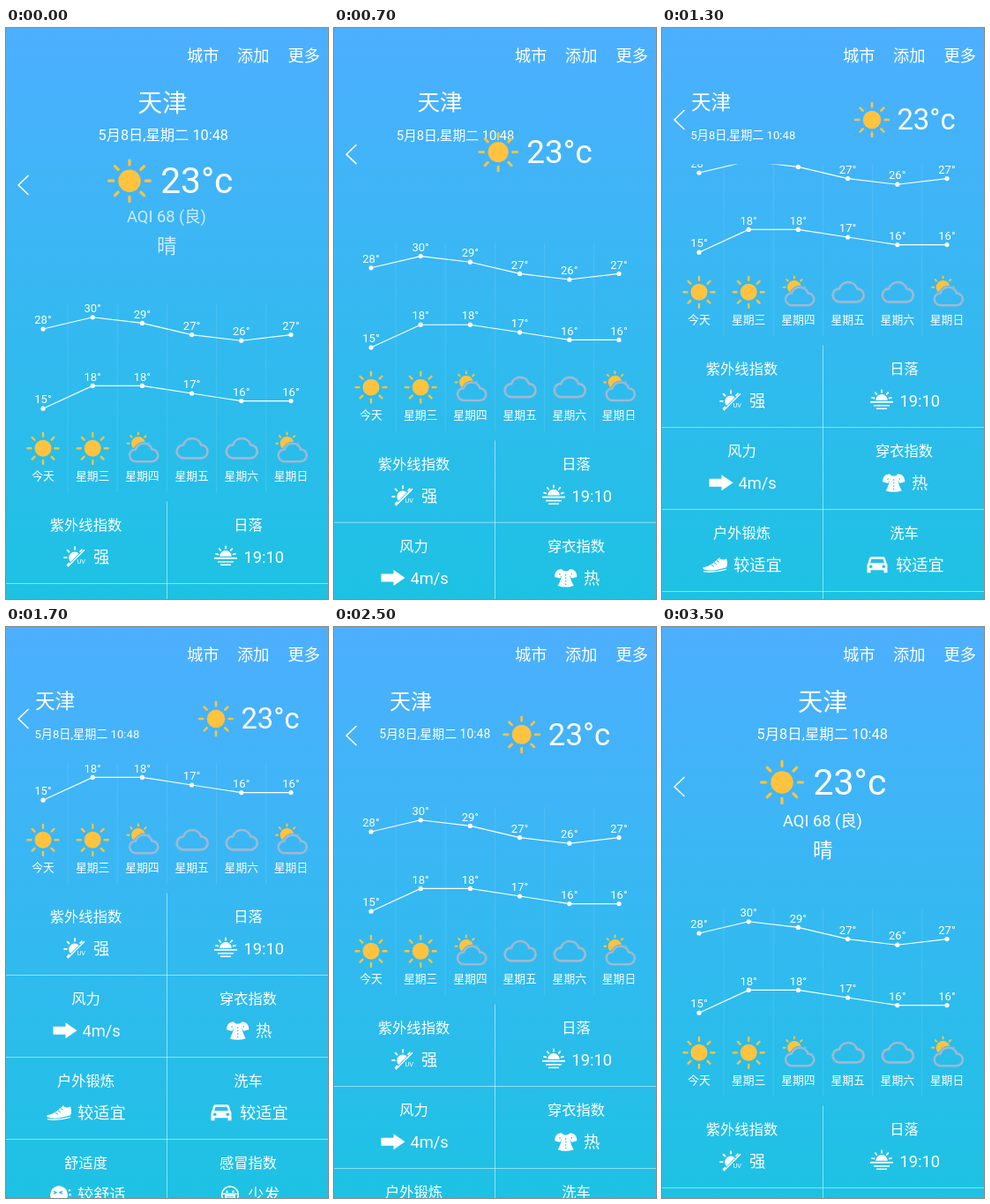
Animation, 365 px wide and 647 px high, one loop 3800 ms. Source, as an HTML page:

```html
<!DOCTYPE html>
<html lang="zh-CN">
<head>
<meta charset="utf-8">
<title>天气</title>
<style>
  html, body { margin: 0; width: 100%; height: 100%; overflow: hidden; background: #1dc2e3; }
  svg { display: block; width: 365px; height: 647px; }
  text { font-family: Roboto, "Noto Sans CJK SC", "Noto Sans CJK", sans-serif; fill: #fff; white-space: pre; }
</style>
</head>
<body>
<svg id="stage" viewBox="0 0 365 647" xmlns="http://www.w3.org/2000/svg"></svg>
<script>
const LOOP = 3800, STEP = 100, COLLAPSE = 153;
const SUN = '#ffc33f', CLOUD = '#a0b8d0', SKY = '#27bee8';

// time in ms, scroll offset in px
const SCROLL = [
  [0, 6], [300, 6], [400, 14], [500, 33], [600, 54], [700, 75.2], [1000, 132],
  [1300, 183], [1700, 241], [1800, 252], [1900, 261], [2000, 267], [2100, 267],
  [2200, 240], [2300, 200], [2400, 156], [2500, 115], [2600, 87], [2700, 64],
  [2800, 45], [2900, 29], [3000, 15.8], [3100, 6], [3200, 1], [3300, 1],
  [3400, 0.5], [3500, 0], [3800, 0]
];

const text = (str, x, y, size, anchor = 'start', extra = '') =>
  `<text x="${x}" y="${y + size * 0.38}" font-size="${size}" text-anchor="${anchor}" ${extra}>${str}</text>`;
const line = (x1, y1, x2, y2, opacity, width = 1) =>
  `<path d="M${x1} ${y1}L${x2} ${y2}" stroke="#fff" stroke-width="${width}" opacity="${opacity}"/>`;
const group = (x, y, body, extra = '') => `<g transform="translate(${x} ${y})" ${extra}>${body}</g>`;

function rays(cx, cy, inner, outer, angles, width, color) {
  const d = angles.map(a => {
    const c = Math.cos(a * Math.PI / 180), s = Math.sin(a * Math.PI / 180);
    return `M${cx + c * inner} ${cy + s * inner}L${cx + c * outer} ${cy + s * outer}`;
  }).join('');
  return `<path d="${d}" stroke="${color}" stroke-width="${width}" stroke-linecap="round" fill="none"/>`;
}

const ALL_AROUND = [0, 45, 90, 135, 180, 225, 270, 315];
const sun = `<circle r="12.8" fill="${SUN}"/>` + rays(0, 0, 18.3, 23.6, ALL_AROUND, 3.2, SUN);

const CLOUD_PATH = 'M-10 11A7.5 7.5 0 0 1 -10 -4A10.5 10.5 0 0 1 10 -4A7.5 7.5 0 0 1 10 11Z';
const cloud = `<path d="${CLOUD_PATH}" fill="none" stroke="${CLOUD}" stroke-width="2.7"/>`;
const partly =
  `<g mask="url(#behindCloud)"><circle cx="-4.5" cy="-5.5" r="7.8" fill="${SUN}"/>` +
  rays(-4.5, -5.5, 10.3, 12.3, ALL_AROUND, 2, SUN) + '</g>' +
  `<g transform="translate(1.8 4.8) scale(.92)">${cloud}</g>`;

const icons = {
  uv: '<path d="M-4.8 5.6A6.6 6.6 0 0 1 4.6 -3.8Z"/>' +
    rays(0, 0.8, 9.3, 11.8, [135, 180, 225, 270, 312], 2, '#fff') +
    line(-8, 11, 11, -8, 1, 1.5) + text('UV', 2.5, 5, 7.5),
  sunset: '<path d="M-6.8 -.5A6.8 6.8 0 0 1 6.8 -.5Z"/>' +
    rays(0, -0.5, 9, 11.3, [195, 230, 270, 310, 345], 1.8, '#fff') +
    line(-13, 1.5, 13, 1.5, 1, 1.8) + line(-9, 5.5, 9, 5.5, 1, 1.6) + line(-6, 9, 6, 9, 1, 1.5),
  arrow: '<path d="M-13 -4.5H1V-9L14 0L1 9V4.5H-13Z"/>',
  dress: '<path d="M-5 -10Q0 -5 5 -10L9 -9Q13 -6 12.5 -1L7 0.5L5 -1Q6 4 9 9Q0 12 -9 9Q-6 4 -5 -1L-7 .5L-12.5 -1Q-13 -6 -9 -9Z"/>' +
    `<path d="M0 -4V9M-7 -5L-5 -1M7 -5L5 -1" stroke="${SKY}" stroke-width="1.2" stroke-dasharray="1.5 2"/>`,
  shoe: '<path d="M-13.5 3Q-7 2 -2 -2L5 -8Q8 -4 13 -7Q15 -1 13 3Q5 5 1 6Q-8 7 -13.5 5Z"/>' +
    '<path d="M-13 7.5Q0 9 13 5" fill="none" stroke="#fff" stroke-width="1.4"/>' +
    `<path d="M-4 0L-1 2M-1 -2.5L2 -.5M2 -5L5 -3" stroke="${SKY}" stroke-width="1"/>`,
  car: '<path d="M-7 -9H7Q8.5 -9 9 -7L10.5 -2Q11.5 -1 11.5 1V9H7.5V6H-7.5V9H-11.5V1Q-11.5 -1 -10.5 -2L-9 -7Q-8.5 -9 -7 -9Z"/>' +
    `<path d="M-6.5 -6.5H6.5L8 -2H-8Z" fill="${SKY}"/><circle cx="-7.3" cy="2" r="1.8" fill="${SKY}"/><circle cx="7.3" cy="2" r="1.8" fill="${SKY}"/>`,
  face: '<circle cx="-2" r="10"/>' +
    `<path d="M-8 -4L-5 -2.5L-8 -1M2 -4L-1 -2.5L2 -1M-6 4Q-2 8 2 4" fill="none" stroke="${SKY}" stroke-width="1.4"/>` +
    '<circle cx="10" cy="-5" r="1.3"/><circle cx="10.5" cy="0" r="1.3"/><circle cx="9.5" cy="5" r="1.3"/>',
  mask: '<circle r="9.3" fill="none" stroke="#fff" stroke-width="1.7"/><path d="M-6 0H6V4Q0 9 -6 4Z"/>' +
    '<circle cx="-3.5" cy="-3.5" r="1.3"/><circle cx="3.5" cy="-3.5" r="1.3"/>' + line(-9, -1, 9, -1, 1, 1.3) +
    `<path d="M-4 2.5H4M-3 4.8H3" stroke="${SKY}" stroke-width=".9"/>`
};

// day, high, low, icon
const DAYS = [
  ['今天', 28, 15, 'sun'], ['星期三', 30, 18, 'sun'], ['星期四', 29, 18, 'partly'],
  ['星期五', 27, 17, 'cloud'], ['星期六', 26, 16, 'cloud'], ['星期日', 27, 16, 'partly']
];
const SKIES = {
  sun: `<g transform="scale(.74)">${sun}</g>`,
  cloud: `<g transform="translate(.5 0)">${cloud}</g>`,
  partly
};

// title, icon, icon x, value, value x
const CELLS = [
  ['紫外线指数', 'uv', 78, '强', 99], ['日落', 'sunset', 249, '19:10', 269.5],
  ['风力', 'arrow', 66.5, '4m/s', 86.5], ['穿衣指数', 'dress', 262.7, '热', 283],
  ['户外锻炼', 'shoe', 60, '较适宜', 81], ['洗车', 'car', 244, '较适宜', 265],
  ['舒适度', 'face', 62, '较舒适', 81], ['感冒指数', 'mask', 254, '少发', 274]
];

const dayX = i => 42 + i * 56.2;

function series(column, yOf) {
  const points = DAYS.map((day, i) => [dayX(i), yOf(day[column])]);
  return `<polyline points="${points.join(' ')}" fill="none" stroke="#fff" stroke-width="1.1"/>` +
    points.map(([x, y], i) => `<circle cx="${x}" cy="${y}" r="2.6" fill="#fff"/>` +
      text(DAYS[i][column] + '°', x, y - 10.8, 13, 'middle')).join('');
}

function forecast() {
  const dividers = [1, 2, 3, 4, 5].map(i => line(dayX(i) - 28.2, 319, dayX(i) - 28.2, 532, 0.1)).join('');
  const days = DAYS.map(([name, , , sky], i) =>
    group(dayX(i), 482.3, SKIES[sky]) + text(name, dayX(i), 513.5, 12.8, 'middle')).join('');
  return dividers + series(1, t => 347 - (t - 28) * 6.6) + series(2, t => 437.2 - (t - 15) * 8.6) + days;
}

function indices() {
  const rules = [0, 1, 2].map(i => line(0, 635.5 + 93 * i, 365, 635.5 + 93 * i, 0.5)).join('');
  return rules + line(182.5, 542.5, 182.5, 914.5, 0.5) + CELLS.map(([title, icon, ix, value, vx], i) => {
    const y = 93 * (i >> 1);
    return text(title, i % 2 ? 274.5 : 90.5, 569 + y, 16.3, 'middle') +
      group(ix, 605.3 + y, icons[icon], 'fill="#fff"') + text(value, vx, 605.5 + y, 18.3);
  }).join('');
}

const stage = document.getElementById('stage');
stage.innerHTML = `
  <defs>
    <linearGradient id="sky" x2="0" y2="1"><stop stop-color="#4dafff"/><stop offset="1" stop-color="#1dc2e3"/></linearGradient>
    <clipPath id="view"><rect y="154.5" width="365" height="493"/></clipPath>
    <mask id="behindCloud" maskUnits="userSpaceOnUse" x="-25" y="-25" width="50" height="50">
      <rect x="-25" y="-25" width="50" height="50" fill="#fff"/>
      <path d="${CLOUD_PATH}" transform="translate(1.8 4.8) scale(.92)" stroke="#000" stroke-width="4.5"/>
    </mask>
  </defs>
  <rect width="365" height="647" fill="url(#sky)"/>
  ${text('城市', 205, 31.5, 18.3)}${text('添加', 262, 31.5, 18.3)}${text('更多', 319.5, 31.5, 18.3)}
  <g clip-path="url(#view)"><g id="page">
    <g id="detail">${text('AQI 68 (良)', 182, 219.3, 18.3, 'middle')}${text('晴', 182.3, 252.5, 22.5, 'middle')}</g>
    ${forecast()}${indices()}
  </g></g>
  <g id="city">${text('天津', 0, 0, 28.3)}</g>
  <g id="date">${text('5月8日,星期二 10:48', 0, 0, 16.4)}</g>
  <g id="now">${group(25, 0, sun)}${text('23°c', 60.5, -1.5, 41)}</g>
  <path id="back" d="M25.5 -11L14 0L25.5 11" fill="none" stroke="#fff" stroke-width="1.5"/>`;

const part = id => document.getElementById(id);
const [page, detail, city, date, now, back] = ['page', 'detail', 'city', 'date', 'now', 'back'].map(part);

function scrollAt(t) {
  const i = SCROLL.findIndex(([end]) => end > t);
  const [t0, s0] = SCROLL[i - 1], [t1, s1] = SCROLL[i];
  return s0 + (s1 - s0) * (t - t0) / (t1 - t0);
}

function place(el, x, y, scale = 1) {
  el.setAttribute('transform', `translate(${x} ${y}) scale(${scale})`);
}

function draw(t) {
  const scroll = scrollAt(Math.floor(t / STEP) * STEP);
  const p = Math.min(1, scroll / COLLAPSE), scale = 1 - 0.2 * p;
  place(page, 0, -scroll);
  detail.setAttribute('opacity', Math.max(0, 1 - scroll / 24));
  place(city, 154 - 121 * p, 84 - 0.5 * p, scale);
  place(date, 107.5 - 75 * p, 121, scale);
  place(now, 111 + 107 * p, 176 - 72 * p, scale);
  place(back, 0, 181 - 77 * p);
}

const start = performance.now();
function tick() {
  draw((performance.now() - start) % LOOP);
  requestAnimationFrame(tick);
}
tick();
</script>
</body>
</html>
```
